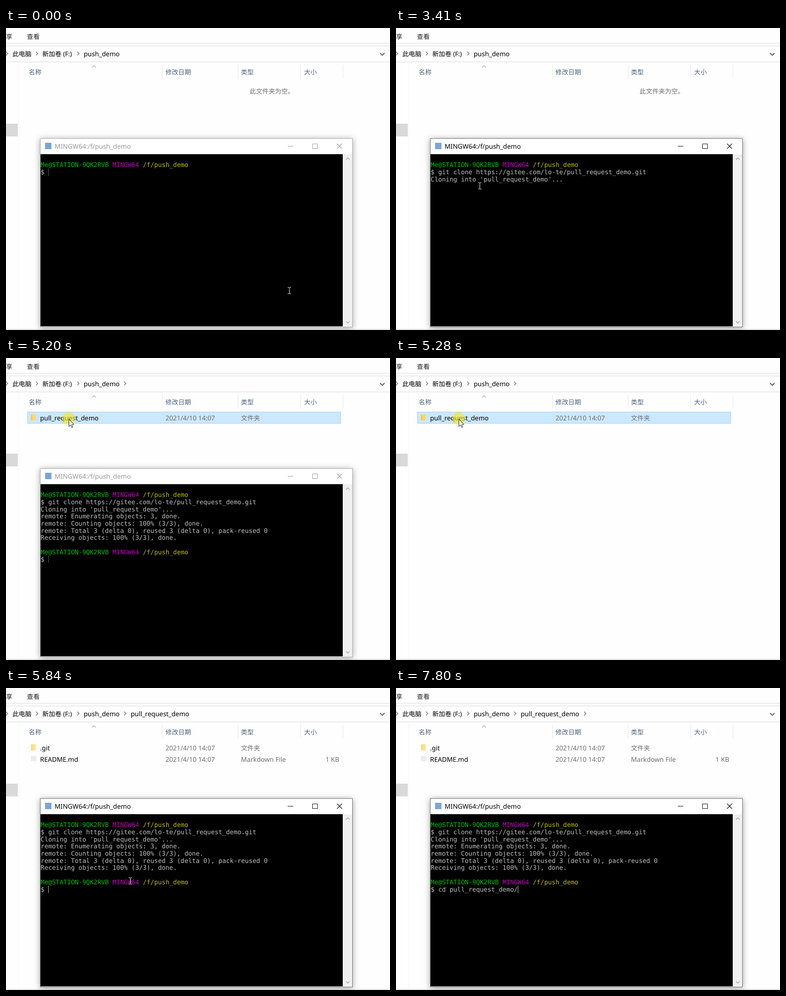
These frames come from a looping animation (845x663 px, 8 s). An HTML page with a canvas:

```html
<!DOCTYPE html>
<html lang="zh-CN">
<head>
<meta charset="utf-8">
<title>git clone</title>
<style>
  html, body { margin: 0; width: 100%; height: 100%; overflow: hidden; background: #fefefe; }
  canvas { display: block; }
</style>
</head>
<body>
<canvas id="stage" width="845" height="663"></canvas>
<script>
const ctx = document.getElementById('stage').getContext('2d');
const LOOP = 8000, BLINK = 545;
const UI = '"Noto Sans", "Noto Sans CJK SC", "Noto Sans CJK", sans-serif';
const MONO = '"DejaVu Sans Mono", monospace';
const COL = 8.33, ROW = 15.67, LEFT = 76.3, TOP = 285.3;
const GREY = '#bfbfbf', GREEN = '#00bf00', MAGENTA = '#bf00bf', YELLOW = '#bfbf00';
const COMMAND = 'git clone https://gitee.com/lo-te/pull_request_demo.git';

// Moments of the story, in ms
const T = {
  leave: 140, enter: 1530, focus: 2240, paste: 2780, clone: 2860, receive: 3640, done: 3960,
  hover: 4490, click: 5200, raise: 5280, open: 5440, back: 5840,
  compose: 6550, cancel: 6950, type: 7260, complete: 7800
};

// Pointer strokes: start, end, steps, then a quadratic curve
const strokes = [
  [0, 70, 1, [623, 576], [310, 410], [-4, 249]],
  [T.enter, 2080, 7, [166, 296], [309, 471], [184, 346]],
  [4190, 5030, 10, [184, 346], [265, 170], [138, 134]],
  [T.open, 5750, 4, [138, 134], [150, 200], [265, 394]],
  [5750, 6160, 5, [265, 394], [291, 431], [234, 483]]
];

const between = (t, a, b) => t >= a && t < b;
const clamp = (v, lo, hi) => Math.min(hi, Math.max(lo, v));

function pointerAt(t) {
  if (between(t, T.leave, T.enter) || t >= T.type) return null;
  const [start, end, steps, a, b, c] = strokes.findLast(s => t >= s[0]);
  const s = Math.floor(clamp((t - start) / (end - start), 0, 1) * steps) / steps;
  const e = 1 - (1 - s) ** 2;
  return [0, 1].map(i => (1 - e) ** 2 * a[i] + 2 * e * (1 - e) * b[i] + e * e * c[i])
    .map(Math.round);
}

function inputAt(t) {
  if (t >= T.complete) return 'cd pull_request_demo/';
  if (t >= T.type) return 'cd p'.slice(0, clamp(Math.floor((t - T.type - 60) / 80), 1, 4));
  if (between(t, T.compose, T.cancel)) return between(t, T.compose + 90, T.cancel - 80) ? 'cd' : 'c';
  return '';
}

function caretAt(t) {
  if (t < T.paste) return [2, 2];
  if (t < T.clone) return [2 + COMMAND.length, 2];
  if (t < T.receive) return [0, 4];
  if (t < T.done) return [0, 8];
  return [2 + inputAt(t).length, 10];
}

// The caret blinks anew after each activity
function caretLit(t) {
  const wake = [0, T.focus, T.paste, T.clone, T.receive, T.done, T.back, T.compose, T.cancel, T.type, T.complete];
  return Math.floor((t - wake.findLast(w => t >= w)) / BLINK) % 2 === 0;
}

function rect(x, y, w, h, color) {
  ctx.fillStyle = color;
  ctx.fillRect(x, y, w, h);
}

function frame(x, y, w, h, color) {
  ctx.strokeStyle = color;
  ctx.lineWidth = 1;
  ctx.strokeRect(x + .5, y + .5, w - 1, h - 1);
}

function path(points, color, width = 1) {
  ctx.beginPath();
  points.forEach(([x, y]) => ctx.lineTo(x, y));
  ctx.strokeStyle = color;
  ctx.lineWidth = width;
  ctx.stroke();
}

function write(text, x, y, color, font) {
  ctx.font = font;
  ctx.fillStyle = color;
  ctx.fillText(text, x, y);
}

const han = (text, x, y, color) => write(text, x, y + 5, color, '14px ' + UI);
const latin = (text, x, y, color) => write(text, x, y + 5, color, '14.4px ' + UI);

const chevron = (x, y) => path([[x - 2, y - 4], [x + 2, y], [x - 2, y + 4]], '#666', 1.2);
const vee = (x, y, w, h, color, width) =>
  path([[x - w, y - h], [x, y + h], [x + w, y - h]], color, width);

function folderIcon(y, alpha) {
  ctx.globalAlpha = alpha;
  rect(55, y - 8, 9, 14, '#ffe08a');
  rect(57, y - 7, 9, 13, '#ffd970');
  rect(55, y - 7, 3, 13, '#f7c64d');
  ctx.globalAlpha = 1;
}

function fileRow(name, y, type, size = '') {
  latin(name, 75, y, '#000');
  latin('2021/4/10 14:07', 351, y, '#6d6d6d');
  (type === '文件夹' ? han : latin)(type, 517, y, '#6d6d6d');
  latin(size, 703, y, '#6d6d6d');
}

function explorer(t) {
  const opened = t >= T.open;
  rect(0, 0, 845, 663, '#fefefe');
  rect(0, 33, 845, 1, '#dadada');
  rect(0, 39, 845, 1, '#d9d9d9');
  rect(0, 74, 845, 1, '#d9d9d9');
  rect(28, 76, 1, 585, '#f5f5f5');
  rect(0, 210, 26, 28, '#d9d9d9');
  rect(0, 661, 845, 1, '#c8c8c8');

  han('享', 0, 19, '#222');
  han('查看', 46, 19, '#222');
  [2, 68, 159].forEach(x => chevron(x, 56));
  han('此电脑', 14, 57, '#000');
  han('新加卷 (F:)', 80, 57, '#000');
  latin('push_demo', 171, 57, '#000');
  if (t >= 4340) chevron(262, 56);
  if (opened) latin('pull_request_demo', 274.5, 57, '#000');
  if (t >= 5940) chevron(416, 56);
  vee(828, 57.5, 5, 2.5, '#555', 1.8);

  vee(193.5, 84.5, 4, -2, '#666', 1);
  han('名称', 50, 97, '#4c607a');
  han('修改日期', 351, 97, '#4c607a');
  han('类型', 517, 97, '#4c607a');
  han('大小', 656, 97, '#4c607a');
  [344, 510, 648, 741].forEach(x => rect(x, 81, 1, 30, '#e5e5e5'));

  if (t < T.done) {
    han('此文件夹为空。', 536, 139, '#6d6d6d');
  } else if (!opened) {
    if (t >= T.hover) rect(47, 118, 690, 26, t < T.click ? '#e5f3ff' : '#cce8ff');
    if (t >= T.click) frame(47, 118, 690, 26, '#99d1ff');
    folderIcon(131, 1);
    fileRow('pull_request_demo', 132, '文件夹');
  } else {
    folderIcon(131, .55);
    fileRow('.git', 132, '文件夹');
    rect(55, 149, 12, 12, '#ececec');
    fileRow('README.md', 157, 'Markdown File', '1 KB');
  }
}

function line(row, ...runs) {
  let col = 0;
  for (const [text, color = GREY] of runs) {
    write(text, LEFT + col * COL, Math.round(TOP + row * ROW + 4.5), color, '13.84px ' + MONO);
    col += text.length;
  }
}

const prompt = row => line(row, ['Me@STATION-9QK2RVB ', GREEN], ['MINGW64 ', MAGENTA], ['/f/push_demo', YELLOW]);

function caret(t, active) {
  const [col, row] = caretAt(t);
  const x = Math.round(LEFT + col * COL + .4), y = Math.round(TOP + row * ROW - 7.8);
  if (!active) for (let i = 0; i < 16; i += 2) rect(x, y + i, 1, 1, GREY);
  else if (caretLit(t)) rect(x, y, 1, 16, GREY);
}

function candidates(text) {
  rect(93, 449, text.length * COL, 1, GREY);
  rect(90, 455, 544, 50, '#fff');
  frame(90, 455, 544, 50, '#d0d0d0');
  const words = text === 'c' ? '才 从 出 次 错 成 层 词' : '菜单 传达 程度 长度 承担 测定';
  const list = words.split(' '), step = 520 / list.length;
  list.forEach((word, i) =>
    write(i + 1 + ' ' + word, 104 + i * step, 486, i ? '#222' : '#0067c0', '17px ' + UI));
}

function titleBar(ink) {
  rect(86, 252, 14, 14, '#7aa5d6');
  latin('MINGW64:/f/push_demo', 107, 260, ink);
  rect(620, 259, 12, 1, ink);
  frame(674, 254, 12, 11, ink);
  path([[728.5, 254], [739.5, 265]], ink, 1.1);
  path([[739.5, 254], [728.5, 265]], ink, 1.1);
}

function terminal(t) {
  const active = between(t, T.focus, T.click) || t >= T.back;
  ctx.save();
  ctx.shadowColor = 'rgba(0,0,0,.36)';
  ctx.shadowBlur = 13;
  ctx.shadowOffsetY = 2;
  rect(75, 242, 688, 415, active ? '#6a6a6a' : '#aaa');
  ctx.restore();
  rect(76, 243, 686, 413, '#fff');
  rect(76, 277, 665, 378, '#000');
  rect(741, 277, 21, 379, '#f0f0f0');
  vee(752, 287, 4, -2, '#a3a3a3', 1.5);
  vee(752, 646, 4, 2, '#a3a3a3', 1.5);
  titleBar(active ? '#000' : '#999');

  prompt(1);
  line(2, ['$ ' + (t < T.paste ? '' : COMMAND)]);
  if (t >= T.clone) line(3, ["Cloning into 'pull_request_demo'..."]);
  if (t >= T.receive) {
    line(4, ['remote: Enumerating objects: 3, done.']);
    line(5, ['remote: Counting objects: 100% (3/3), done.']);
    line(6, ['remote: Total 3 (delta 0), reused 3 (delta 0), pack-reused 0']);
    line(7, ['Receiving objects: 100% (3/3), done.']);
  }
  if (t >= T.done) {
    prompt(9);
    line(10, ['$ ' + inputAt(t)]);
  }
  if (between(t, T.compose, T.cancel)) candidates(inputAt(t));
  caret(t, active);
}

function beam(x, y) {
  ctx.save();
  ctx.globalCompositeOperation = 'difference';
  rect(x, y - 6, 1, 13, '#fff');
  for (const side of [-3, 1]) {
    rect(x + side, y - 7, 3, 1, '#fff');
    rect(x + side, y + 7, 3, 1, '#fff');
  }
  ctx.restore();
}

function arrow(x, y) {
  ctx.beginPath();
  [[0, 0], [0, 16], [3.7, 12.6], [6.2, 18], [8.6, 17], [6.2, 11.6], [11, 11.3]]
    .forEach(([dx, dy]) => ctx.lineTo(x + .5 + dx, y + .5 + dy));
  ctx.closePath();
  ctx.fillStyle = '#fff';
  ctx.fill();
  ctx.strokeStyle = '#111';
  ctx.lineWidth = 1;
  ctx.stroke();
}

function pointer(t, hasTerminal) {
  const spot = pointerAt(t);
  if (!spot) return;
  const [x, y] = spot;
  if (between(t, T.click, T.open)) {
    ctx.beginPath();
    ctx.arc(x, y - 1, 14, 0, 7);
    ctx.fillStyle = 'rgba(240,232,30,.62)';
    ctx.fill();
  }
  const overText = hasTerminal && x > 76 && x < 741 && y > 277 && y < 655;
  (overText ? beam : arrow)(x, y);
}

function draw(now) {
  const t = now % LOOP;
  const hasTerminal = !between(t, T.raise, T.back);
  ctx.textRendering = 'geometricPrecision';
  explorer(t);
  if (hasTerminal) terminal(t);
  pointer(t, hasTerminal);
}

let start;
function tick(now) {
  start ??= now;
  draw(Math.max(0, now - start));
  requestAnimationFrame(tick);
}
draw(0);
requestAnimationFrame(tick);
</script>
</body>
</html>
```
